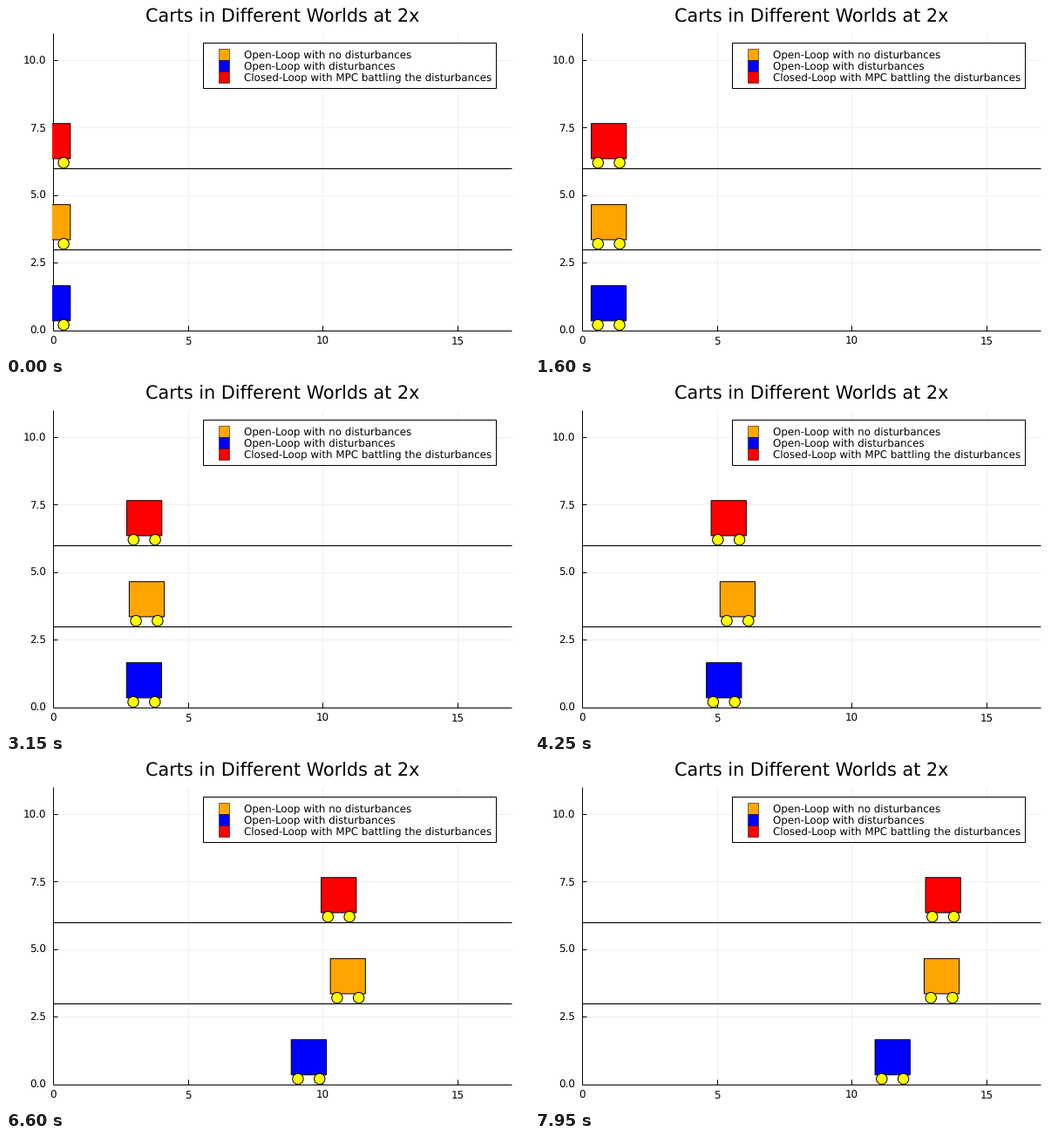
Write a matplotlib script that moves like this. It is 600 by 400 pixels and loops after 8000 ms.

```python
import numpy as np
import matplotlib.pyplot as plt
from matplotlib.animation import FuncAnimation
from matplotlib.patches import Circle, Rectangle

plt.rcParams.update({"font.family": "DejaVu Sans", "text.hinting": "none"})

W, H, DPI = 600, 400, 100
PT = 72 / DPI                  # points per pixel
X0, Y0, UNIT = 53.7, 371.7, 30.975
X_MAX, Y_MAX = 17, 11
STEP, LOOP = 50, 8000
SMALL, LARGE = 11.87 * PT, 20.75 * PT
BODY, WHEEL, AXLE = 1.3, 0.2, 0.4

# cart positions in axis units at a few moments (ms)
TIMES = np.array([50, 900, 1600, 2600, 3150, 4250, 5450, 6600, 7950])
CARTS = [
    ("blue", 0, [0, 0.33, 0.995, 2.45, 3.38, 5.265, 7.47, 9.48, 11.51]),
    ("orange", 3, [0, 0.33, 1.0, 2.47, 3.48, 5.77, 8.45, 10.93, 13.33]),
    ("red", 6, [0, 0.33, 1.0, 2.455, 3.39, 5.44, 8.05, 10.59, 13.38]),
]
LEGEND = [
    ("orange", "Open-Loop with no disturbances"),
    ("blue", "Open-Loop with disturbances"),
    ("red", "Closed-Loop with MPC battling the disturbances"),
]


def px(x):
    return X0 + x * UNIT


def py(y):
    return Y0 - y * UNIT


def smooth_path(values):
    """Cubic Hermite curve through the key positions, starting at rest."""
    p = np.array(values, float)
    v = np.gradient(p, TIMES, edge_order=2)
    v[0] = 0

    def at(t):
        i = int(np.clip(np.searchsorted(TIMES, t) - 1, 0, len(p) - 2))
        h = TIMES[i + 1] - TIMES[i]
        u = (t - TIMES[i]) / h
        return ((1 + 2 * u) * (1 - u) ** 2 * p[i] + u * (1 - u) ** 2 * h * v[i]
                + u * u * (3 - 2 * u) * p[i + 1] - u * u * (1 - u) * h * v[i + 1])

    return at


fig = plt.figure(figsize=(W / DPI, H / DPI), dpi=DPI, facecolor="white")
ax = fig.add_axes([0, 0, 1, 1])
ax.set_xlim(0, W)
ax.set_ylim(H, 0)
ax.axis("off")


def line(xs, ys, color="black", width=1.0, z=1):
    ax.plot(xs, ys, color=color, lw=width * PT, zorder=z, solid_capstyle="butt")


def label(x, y, text, size=SMALL, ha="center", z=2):
    ax.text(x, y, text, size=size, ha=ha, va="baseline", zorder=z)


def draw_axes():
    left, right, top = X0, px(X_MAX), py(Y_MAX)
    for x in (0, 5, 10, 15):
        if x:
            line([px(x)] * 2, [top, Y0], "#efefef", z=0)
            line([px(x)] * 2, [Y0 - 5.3, Y0])
        label(px(x), Y0 + 16.2, str(x))
    for y in (0, 2.5, 5, 7.5, 10):
        if y:
            line([left, right], [py(y)] * 2, "#efefef", z=0)
            line([left, left + 5.3], [py(y)] * 2)
        label(left - 7.7, py(y) + 4.4, f"{y:.1f}", ha="right")
    line([left, left], [top, Y0 + 0.5])
    line([left, right], [Y0, Y0])
    for y in (3, 6):
        line([left, right], [py(y)] * 2, width=1.1)
    label((left + right) / 2, 18.4, "Carts in Different Worlds at 2x", LARGE)


def draw_legend():
    ax.add_patch(Rectangle((225.8, 42.3), 336.6, 51.8, fc="white", ec="black",
                           lw=PT, zorder=8))
    for i, (color, text) in enumerate(LEGEND):
        y = 49 + 13 * i
        ax.add_patch(Rectangle((243.5, y), 12.9, 13, fc=color, ec="black",
                               lw=0.5 * PT, zorder=9))
        label(273, y + 10.6, text, ha="left", z=9)


class Cart:
    def __init__(self, color, ground, values):
        self.path = smooth_path(values)
        size = BODY * UNIT
        style = dict(ec="black", lw=PT, zorder=4, snap=False)
        self.body = Rectangle((0, py(ground + 0.35 + BODY)), size, size,
                              fc=color, **style)
        self.wheels = [Circle((0, py(ground + WHEEL)), WHEEL * UNIT,
                              fc="yellow", **style) for _ in range(2)]
        for part in [self.body, *self.wheels]:
            ax.add_patch(part)
            part.set_clip_path(window)

    def move(self, t):
        x = self.path(t)
        self.body.set_x(px(x - BODY / 2))
        for wheel, side in zip(self.wheels, (-AXLE, AXLE)):
            wheel.center = (px(x + side), wheel.center[1])
        return [self.body, *self.wheels]


draw_axes()
draw_legend()
window = Rectangle((X0 - 0.5, py(Y_MAX)), X_MAX * UNIT, Y_MAX * UNIT + 1,
                   transform=ax.transData)
carts = [Cart(*spec) for spec in CARTS]


def update(i):
    t = max(i * STEP, STEP)    # the first pose is held for two steps
    return [part for cart in carts for part in cart.move(t)]


anim = FuncAnimation(fig, update, frames=LOOP // STEP, interval=STEP,
                     init_func=lambda: update(0), repeat=True, repeat_delay=0)
plt.show()
```
